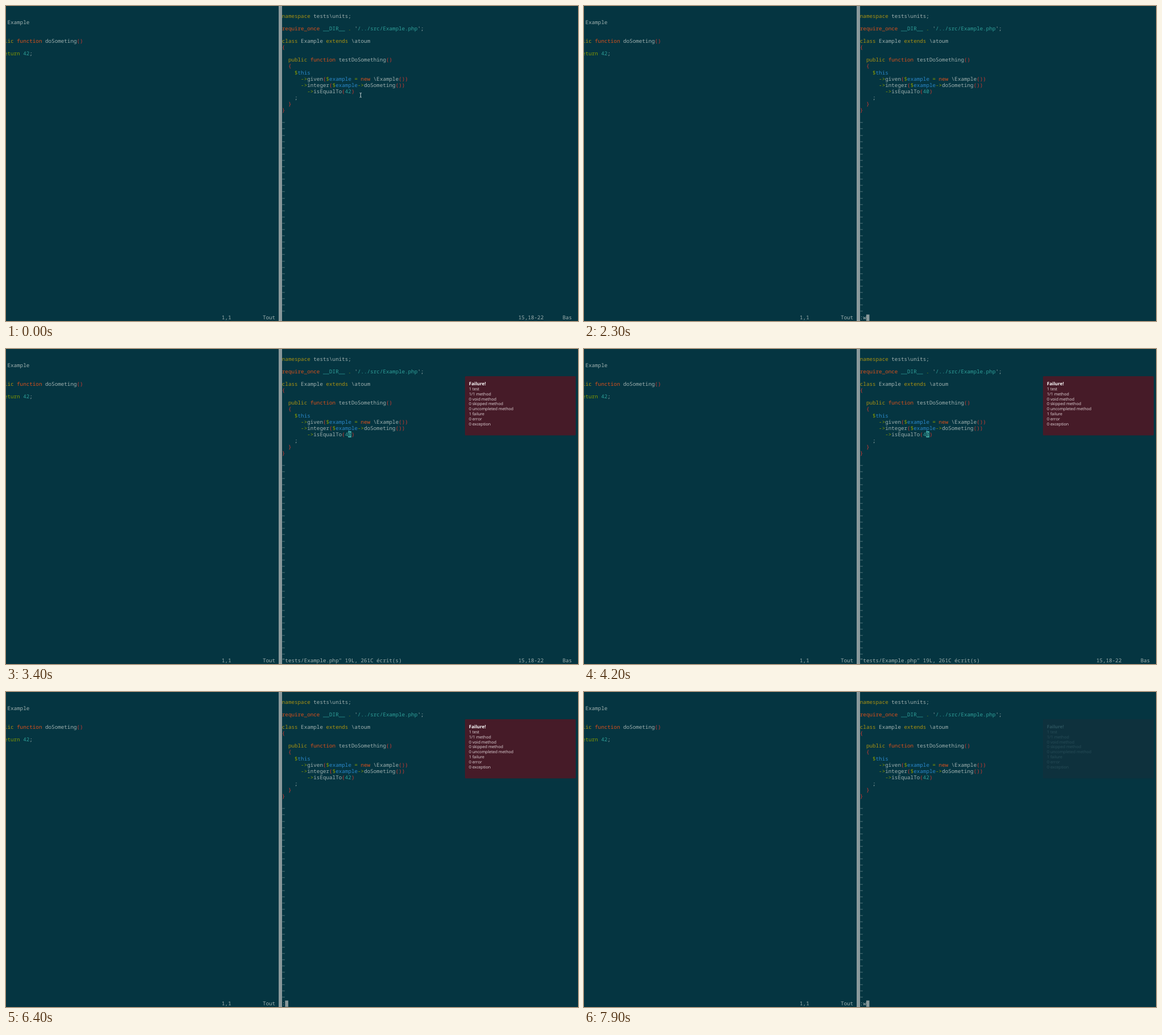
These frames come from a looping animation (1007 by 556 pixels, 8 s). An HTML page:

```html
<!DOCTYPE html>
<html lang="en">
<head>
<meta charset="utf-8">
<title>Editor with test notifications</title>
<style>
html, body { margin: 0; width: 100%; height: 100%; overflow: hidden; background: #053541; }
svg { display: block; width: 1007px; height: 556px; }
text { white-space: pre; text-rendering: geometricPrecision; }
.code { font: 9.25px "Noto Sans Mono", "DejaVu Sans Mono", monospace; }
.note { font: 7.15px "Open Sans", "Noto Sans", sans-serif; fill: #e6dcdf; }
.note .title { font-size: 8px; font-weight: 700; fill: #fff; }
</style>
</head>
<body>
<svg viewBox="0 0 1007 556">
  <rect width="1007" height="556" fill="#053541"/>
  <rect x="480" width="6" height="556" fill="#8a999b"/>
  <g id="base" class="code"></g>
  <g id="live" class="code"></g>
  <path id="mouse" d="M622.6 153.5h1l.7.6.7-.6h1M624.3 154v6.6M622.6 161.1h1l.7-.6.7.6h1" fill="none" stroke="#dfe8e8" stroke-width=".9"/>
  <g id="note" class="note">
    <rect x="808" y="48" width="195" height="104.5" rx="1.5" fill="#461b28"/>
  </g>
</svg>
<script>
const LOOP = 8000, CELL = 5.55, ROW = 11.1, TOP = 11.8;
const LEFT = -30.9, RIGHT = 485.8, STATUS = 48, EDIT = 12;
const INK = {
  w: '#9fb0af', y: '#a89112', g: '#859900', o: '#d9501c', r: '#cf3a32',
  b: '#2b87c8', c: '#2f9f99', t: '#7f999b', d: '#053541'
};
const $ = id => document.getElementById(id);

// A § mark followed by a letter switches the ink.
function line(x0, row, marked, col = 0) {
  const spans = marked.split('§').slice(1)
    .map(s => `<tspan fill="${INK[s[0]]}">${s.slice(1).replace(/>/g, '&gt;')}</tspan>`);
  const x = x0 + col * CELL, y = TOP + row * ROW + 8.8;
  return `<text x="${x.toFixed(2)}" y="${y.toFixed(2)}">${spans.join('')}</text>`;
}

function block(row, col, fill) {
  const x = RIGHT + col * CELL, y = TOP + row * ROW;
  return `<rect x="${x.toFixed(2)}" y="${y.toFixed(2)}" width="${CELL}" height="${ROW}" fill="${fill}"/>`;
}

const source = [
  '§ynamespace §wtests\\units;',
  '',
  "§orequire_once §c__DIR__ §g. §w'§c/../src/Example.php§w';",
  '',
  '§yclass §wExample §yextends §w\\atoum',
  '§r{',
  '',
  '§y  public §ofunction §wtestDoSomething§r()',
  '§r  {',
  '§g    $§bthis',
  '§g      ->§wgiven§r(§g$§bexample §g= §onew §w\\Example§r())',
  '§g      ->§winteger§r(§g$§bexample§g->§wdoSometing§r())',
  '',
  '§w    ;',
  '§r  }',
  '§r}'
];

const base = source.map((s, i) => line(RIGHT, i, s));
for (let row = 17; row < STATUS; row++) base.push(line(RIGHT, row, '§t~'));
base.push(
  line(LEFT, 1, '§yclass §wExample'),
  line(LEFT, 4, '§y  public §ofunction §wdoSometing§r()'),
  line(LEFT, 6, '§g    return §c42§w;'),
  line(LEFT, STATUS, '§w1,1', 74),
  line(LEFT, STATUS, '§wTout', 87)
);
$('base').innerHTML = base.join('');

const report = ['1 test', '1/1 method', '0 void method', '0 skipped method',
  '0 uncompleted method', '1 failure', '0 error', '0 exception'];
$('note').innerHTML += '<text class="title" x="815" y="63.6">Failure!</text>' +
  report.map((s, i) => `<text x="815" y="${72.7 + i * 8.9}">${s}</text>`).join('');

// Each step: start, mode, number in the call, text on the command line.
const WRITTEN = '"tests/Example.php" 19L, 261C écrit(s)';
const steps = [
  [0, 'normal', '42', ''],
  [600, 'insert', '42'],
  [900, 'insert', '4'],
  [1200, 'insert', '40'],
  [1600, 'normal', '40', ''],
  [1800, 'command', '40', ':'],
  [2100, 'command', '40', ':w'],
  [2500, 'normal', '40', WRITTEN],
  [4800, 'insert', '40'],
  [5300, 'insert', '4'],
  [5800, 'insert', '42'],
  [6100, 'normal', '42', ''],
  [6300, 'command', '42', ':'],
  [7600, 'command', '42', ':w']
];

function blinkOn(t) {
  if (t < 3000) return t >= 300 && t < 2500;
  return t % 1200 >= 600;
}

function scene(t) {
  const [, mode, num, msg] = steps.filter(s => s[0] <= t).pop();
  const insert = mode === 'insert', end = 20 + num.length;
  let out = line(RIGHT, EDIT, `§g        ->§wisEqualTo§r(§c${num}§r)`);
  if (insert) {
    out += block(EDIT, 19, '#a8920f') + block(EDIT, end, '#df4b1b');
    out += line(RIGHT, STATUS, '§b-- INSERTION --');
  } else {
    out += line(RIGHT, STATUS, '§w' + msg);
  }
  if (mode === 'command') return out + block(STATUS, msg.length, '#8a999b');
  if (!insert && blinkOn(t)) {
    out += block(EDIT, end - 1, '#43a8a3') + line(RIGHT, EDIT, '§d' + num.slice(-1), end - 1);
  }
  const col = insert ? end : end - 1;
  return out + line(RIGHT, STATUS, `§w15,${col - 3}-${col + 1}`, 75) + line(RIGHT, STATUS, '§wBas', 89);
}

let shown = '';
function update(t) {
  const next = scene(t);
  if (next !== shown) $('live').innerHTML = shown = next;
  $('mouse').style.display = t < 600 ? '' : 'none';
  const fade = Math.max(0, Math.min(1, (7960 - t) / 400));
  $('note').style.opacity = t < 2800 ? 0 : fade;
}

const start = performance.now();
function tick() {
  update((performance.now() - start) % LOOP);
  requestAnimationFrame(tick);
}
tick();
</script>
</body>
</html>
```
